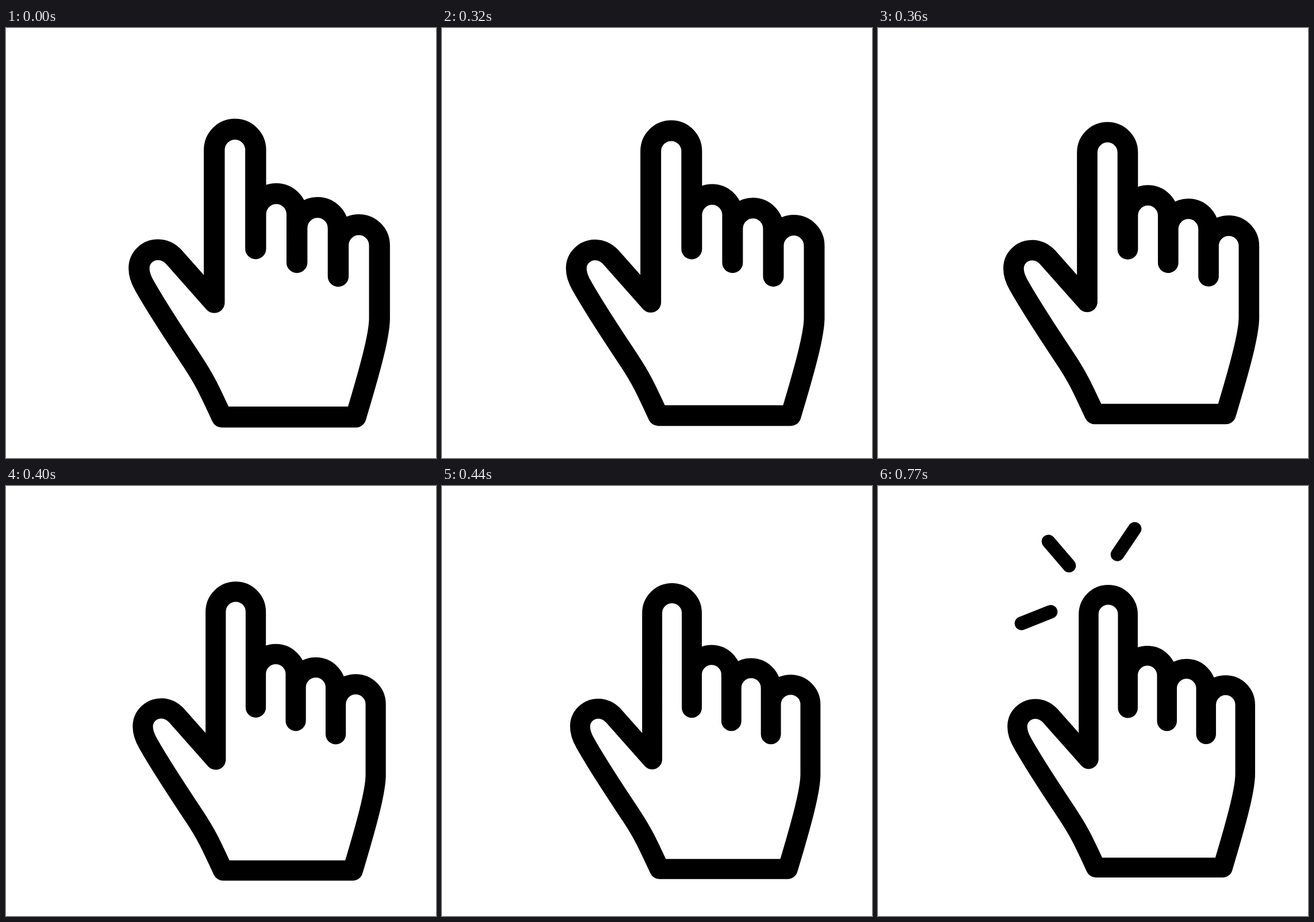
Recreate the animation shown at these times as an HTML page. Size 748x748 px, loop 960 ms.

```html
<!DOCTYPE html>
<html lang="en">
<head>
<meta charset="utf-8">
<title>Click</title>
<style>
  html, body { margin: 0; width: 100%; height: 100%; overflow: hidden; background: #fff; }
  svg { display: block; width: 100%; height: 100%; }
  path { fill: none; stroke: #000; stroke-linecap: round; stroke-linejoin: round; }
</style>
</head>
<body>
<svg viewBox="0 0 748 748">
  <g id="hand" stroke-width="36.4">
    <path d="M362.3 477.6V212a36 36 0 0 1 72 0V384
      M434.3 324a35.9 35.9 0 0 1 71.8 0V408
      M506.1 348a35.9 35.9 0 0 1 71.8 0V432
      M577.9 378a35.9 35.9 0 0 1 71.8 0V505
      C649.7 534 634 592 608.5 676.8H375.5
      C352 626 345 611.5 325 581
      C300 543 266 493 241 448.5
      C236 440 231.4 428 231.4 418
      C231.4 400 246 385.6 265 385.6
      C275 385.8 284 390 291.7 398
      L362.3 477.6"/>
  </g>
  <path id="rays" stroke-width="23.6" visibility="hidden"
    d="M296.5 96.5L332.5 138.5M446.5 74.5L416.5 119M249.5 239L300.5 218.8"/>
</svg>
<script>
  const LOOP = 960, START = 320, STEP = 40, STEPS = 5;
  const SHRINK = 0.0525, CX = 440.5, CY = 426.5;
  const hand = document.getElementById('hand');
  const rays = document.getElementById('rays');

  function draw(time) {
    const t = time % LOOP;
    // The press advances in equal held steps, then snaps back.
    const step = Math.max(0, Math.min(STEPS, Math.floor((t - START) / STEP) + 1));
    const scale = 1 - SHRINK * step / STEPS;
    hand.setAttribute('transform',
      `translate(${CX} ${CY}) scale(${scale}) translate(${-CX} ${-CY})`);
    rays.setAttribute('visibility', step === STEPS ? 'visible' : 'hidden');
  }

  const begin = performance.now();
  function tick() {
    draw(performance.now() - begin);
    requestAnimationFrame(tick);
  }
  tick();
</script>
</body>
</html>
```
